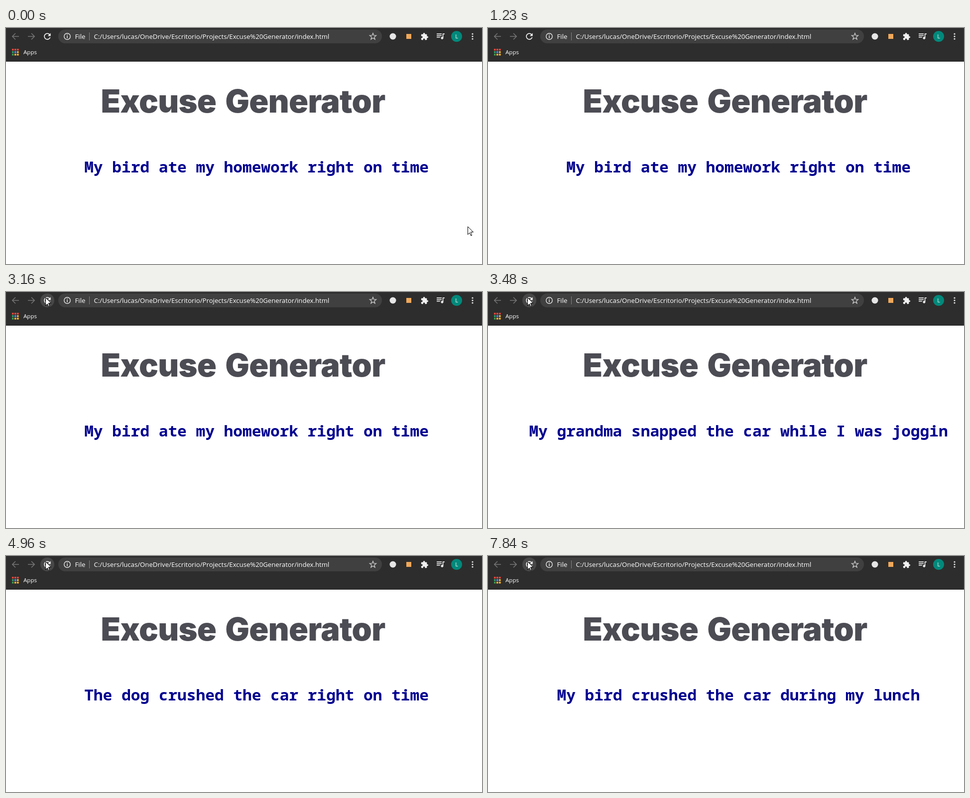
Write an HTML page that moves like this. It is 956 px wide and 477 px high and loops after 7.99 s.

```html
<!DOCTYPE html>
<html lang="en">
<head>
<meta charset="utf-8">
<title>Excuse Generator</title>
<style>
  html, body { margin: 0; width: 100%; height: 100%; overflow: hidden; background: #fff; }
  svg { display: block; width: 100%; height: 100%; }
  .ui { font-family: "Open Sans", "Noto Sans", sans-serif; font-size: 13.18px; fill: #fff; }
  .title { font-family: Inter, sans-serif; font-weight: 900; font-size: 64.6px; letter-spacing: -.7px; word-spacing: 6px; fill: #4c4c54; }
  .excuse { font-family: "Noto Sans Mono", "DejaVu Sans Mono", monospace; font-weight: 600; font-size: 31.17px; fill: #000090; }
  .line { fill: none; stroke-width: 1.6; }
</style>
</head>
<body>
<svg viewBox="0 0 956 477" xmlns="http://www.w3.org/2000/svg">
  <rect width="956" height="477" fill="#fff"/>
  <rect width="956" height="68" fill="#2d2d2d"/>
  <rect y="67" width="956" height="1" fill="#222"/>
  <rect x="105" y="3" width="650" height="28" rx="14" fill="#404040"/>

  <!-- Navigation -->
  <g class="line" stroke="#757575">
    <path d="M26 17H13.2M19 10.8L12.8 17 19 23.2"/>
    <path d="M44 17H56.8M51 10.8L57.2 17 51 23.2"/>
  </g>
  <circle id="hover" cx="83" cy="17" r="14" fill="#474747"/>
  <path fill="#f1f1f1" transform="translate(83 17) scale(.84) translate(-12 -12)" d="M17.65 6.35C16.2 4.9 14.21 4 12 4c-4.42 0-7.99 3.58-7.99 8s3.57 8 7.99 8c3.73 0 6.84-2.55 7.73-6h-2.08c-.82 2.33-3.04 4-5.65 4-3.31 0-6-2.69-6-6s2.69-6 6-6c1.66 0 3.14.69 4.22 1.78L13 11h7V4l-2.35 2.35z"/>

  <!-- Address -->
  <circle class="line" cx="123" cy="17" r="6.2" stroke="#e8e8e8" style="stroke-width:1.4"/>
  <path d="M122.2 16h1.6v4.4h-1.6zM122.2 13.3h1.6v1.5h-1.6z" fill="#e8e8e8"/>
  <text class="ui" x="138.5" y="22">File</text>
  <rect x="167" y="9" width="1" height="16" fill="#858585"/>
  <text class="ui" x="176.5" y="22">C:/Users/lucas/OneDrive/Escritorio/Projects/Excuse%20Generator/index.html</text>
  <path id="star" class="line" stroke="#cfcfcf" style="stroke-width:1.3"/>

  <!-- Extensions -->
  <circle cx="777" cy="17" r="6.5" fill="#e6e6e6"/>
  <rect x="804" y="12" width="10" height="10" fill="#f0a85a"/>
  <path fill="#f1f1f1" transform="translate(841 17) scale(.68) translate(-12.5 -11.5)" d="M20.5 11H19V7c0-1.1-.9-2-2-2h-4V3.5C13 2.12 11.88 1 10.5 1S8 2.12 8 3.5V5H4c-1.1 0-1.99.9-1.99 2v3.8H3.5c1.49 0 2.7 1.21 2.7 2.7s-1.21 2.7-2.7 2.7H2V20c0 1.1.9 2 2 2h3.8v-1.5c0-1.49 1.21-2.7 2.7-2.7 1.49 0 2.7 1.21 2.7 2.7V22H17c1.1 0 2-.9 2-2v-4h1.5c1.38 0 2.5-1.12 2.5-2.5S21.88 11 20.5 11z"/>
  <path fill="#e8e8e8" transform="translate(873 17) scale(.84) translate(-12.5 -13)" d="M15 6H3v2h12V6zm0 4H3v2h12v-2zM3 16h8v-2H3v2zM17 6v8.18c-.31-.11-.65-.18-1-.18-1.66 0-3 1.34-3 3s1.34 3 3 3 3-1.34 3-3V8h3V6h-5z"/>
  <circle cx="905" cy="17" r="11" fill="#00897b"/>
  <text class="ui" x="905" y="21" text-anchor="middle" style="font-size:11px">L</text>
  <g id="dots" fill="#e8e8e8"></g>

  <!-- Bookmarks -->
  <g id="apps"></g>
  <text class="ui" x="35" y="53" style="font-size:11.6px">Apps</text>

  <!-- Page -->
  <text class="title" x="190.5" y="171">Excuse Generator</text>
  <text id="excuse" class="excuse" x="503" y="292" text-anchor="middle"></text>

  <circle id="click" cx="79" cy="11" r="15" fill="#ffee00"/>
  <path id="cursor" d="M.5 .5V16.5L4 13 6.5 18.5H8.5L6.5 11.5H11.5Z" fill="#fff" stroke="#000" stroke-width="1"/>
</svg>
<script>
const LOOP = 7990;
const $ = id => document.getElementById(id);
const add = (parent, tag, attrs) => {
  const el = document.createElementNS("http://www.w3.org/2000/svg", tag);
  for (const key in attrs) el.setAttribute(key, attrs[key]);
  parent.appendChild(el);
};

// Static icons
const red = "#e2483d", green = "#34a05a", blue = "#4c8bf5", yellow = "#f3b32e";
[red, red, red, green, blue, yellow, green, yellow, yellow].forEach((fill, i) =>
  add($("apps"), "rect", { x: 12 + i % 3 * 5, y: 42 + Math.floor(i / 3) * 5, width: 3.6, height: 3.6, fill }));
for (const cy of [12, 17, 22]) add($("dots"), "circle", { cx: 937, cy, r: 1.6 });
$("star").setAttribute("d", "M" + Array.from({ length: 10 }, (_, i) => {
  const a = i * Math.PI / 5, r = i % 2 ? 2.9 : 6.9;
  return (737 + r * Math.sin(a)).toFixed(2) + " " + (17.3 - r * Math.cos(a)).toFixed(2);
}).join("L") + "Z");

// [start, value]: each value holds until the next start
const excuses = [
  [0, "My bird ate my homework right on time"],
  [3480, "My grandma snapped the car while I was joggin"],
  [4650, "The dog crushed the car right on time"],
  [7680, "My bird crushed the car during my lunch"]
];
const moves = [
  [0, [927, 401]], [70, [800, 240]], [130, [731, 72]],
  [680, [715, 160]], [759, [660, 270]], [837, [560, 307]], [916, [430, 270]],
  [994, [270, 150]], [1073, [160, 50]], [1151, [116, 6]], [1230, null]
];
const glide = (start, end, steps, from, to) => {
  for (let i = 0; i < steps; i++) {
    const p = i / (steps - 1), k = 1 - (1 - p) ** 2;
    moves.push([start + (end - start) * p, from.map((v, j) => Math.round(v + (to[j] - v) * k))]);
  }
};
glide(2010, 2550, 8, [403, 240], [61, 26]);
glide(2700, 2860, 3, [64, 23], [70, 18]);
moves.push([3010, [76, 13]], [3090, [79, 11]]);

const clicks = [3240, 4410, 7440];
const at = (track, t) => track.filter(([start]) => start <= t).pop()[1];

function clickAlpha(t) {
  const start = clicks.find(c => t >= c && t < c + 240);
  if (start === undefined) return 0;
  return t - start < 160 ? 0.57 : 0.3;
}

function draw(t) {
  const pos = at(moves, t);
  $("cursor").setAttribute("visibility", pos ? "visible" : "hidden");
  if (pos) $("cursor").setAttribute("transform", `translate(${pos})`);
  $("hover").setAttribute("visibility", t >= 3010 ? "visible" : "hidden");
  $("click").setAttribute("opacity", clickAlpha(t));
  const text = at(excuses, t);
  if ($("excuse").textContent !== text) $("excuse").textContent = text;
}

const begin = performance.now();
function tick() {
  draw((performance.now() - begin) % LOOP);
  requestAnimationFrame(tick);
}
tick();
</script>
</body>
</html>
```
